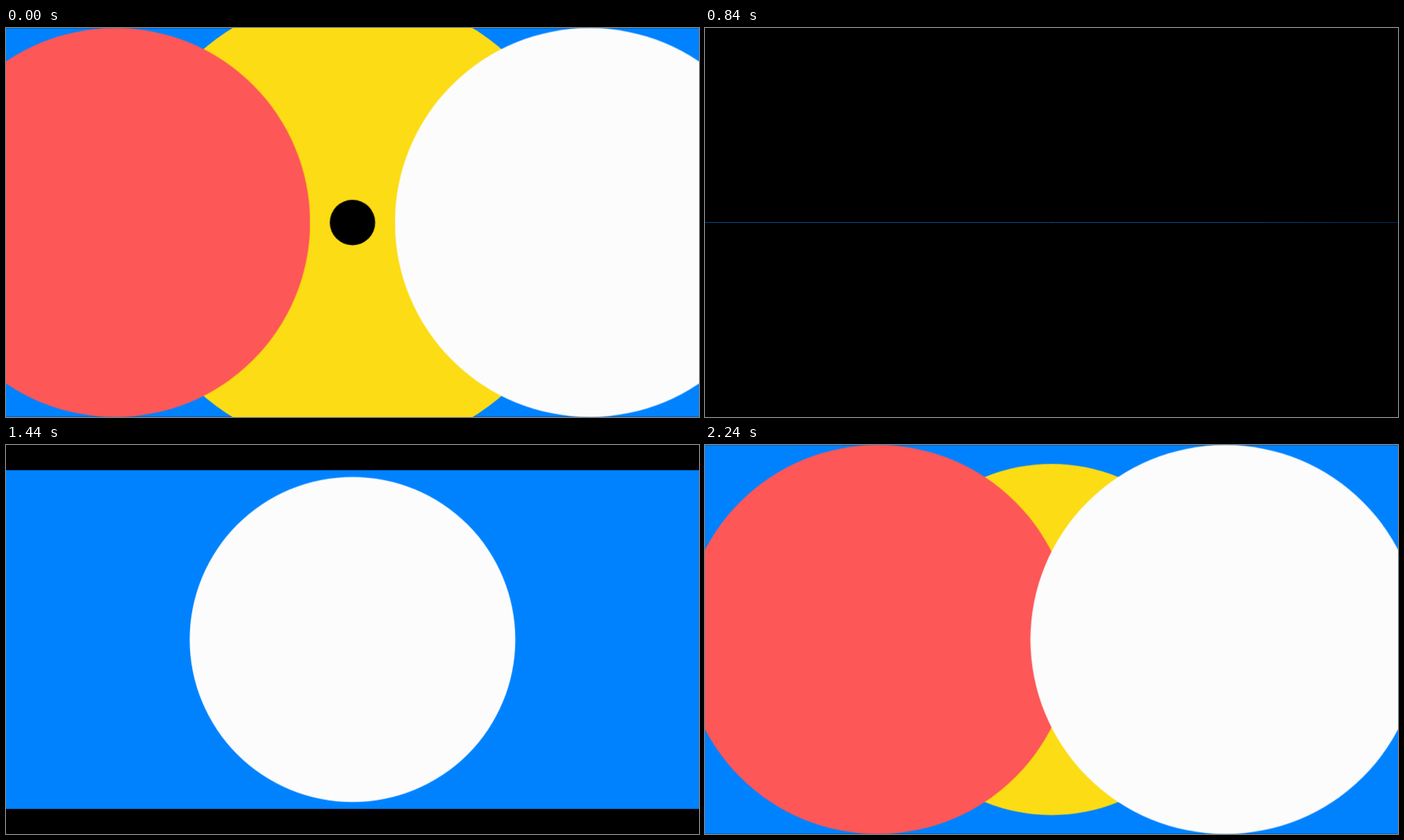
An HTML page without scripts that plays this animation: 998 px wide and 561 px high, repeating every 2.28 s.

```html
<!DOCTYPE html>
<html lang="en">
<head>
<meta charset="utf-8">
<title>Opening circles</title>
<style>
  html, body { margin: 0; width: 100%; height: 100%; overflow: hidden; background: #000; }
  svg { display: block; width: 998px; height: 561px; }

  /* The cycle begins 800 ms into the loop, when the bar opens. */
  .part {
    transform-origin: 0 0;
    animation: 2280ms cubic-bezier(.7, 0, .3, 1) -1480ms infinite;
  }
  .bar    { fill: #0082ff; animation-name: open; animation-timing-function: cubic-bezier(.8, 0, .2, 1); }
  .yellow { fill: #fcdc14; animation-name: yellow; }
  .black  { fill: #000;    animation-name: black; }
  .red    { fill: #fd5757; animation-name: left; }
  .white  { fill: #fcfcfc; animation-name: right; }

  /* Every move lasts 1000 ms, which is 43.8596% of the cycle. */
  @keyframes open {
    0% { transform: scaleY(0); }
    43.8596%, 100% { transform: scaleY(1); }
  }
  @keyframes yellow {
    0%, 42.1053% { transform: scale(0); }
    85.9649%, 100% { transform: scale(1); }
  }
  @keyframes black {
    0%, 54.386% { transform: scale(0); }
    98.2456%, 100% { transform: scale(1); }
  }
  @keyframes left {
    0% { transform: translateX(0) scale(0); animation-timing-function: step-end; }
    43.8596% { transform: translateX(0) scale(1); }
    87.7193%, 100% { transform: translateX(-781px) scale(1); }
  }
  @keyframes right {
    0% { transform: translateX(0) scale(0); }
    43.8596% { transform: translateX(0) scale(1); }
    87.7193%, 100% { transform: translateX(781px) scale(1); }
  }
</style>
</head>
<body>
<svg viewBox="0 0 998 561">
  <g transform="translate(499 280.5)">
    <rect class="part bar" x="-499" y="-280.5" width="998" height="561"/>
    <circle class="part yellow" r="579"/>
    <circle class="part black" r="579"/>
    <circle class="part red" r="280.5"/>
    <circle class="part white" r="280.5"/>
  </g>
</svg>
</body>
</html>
```
